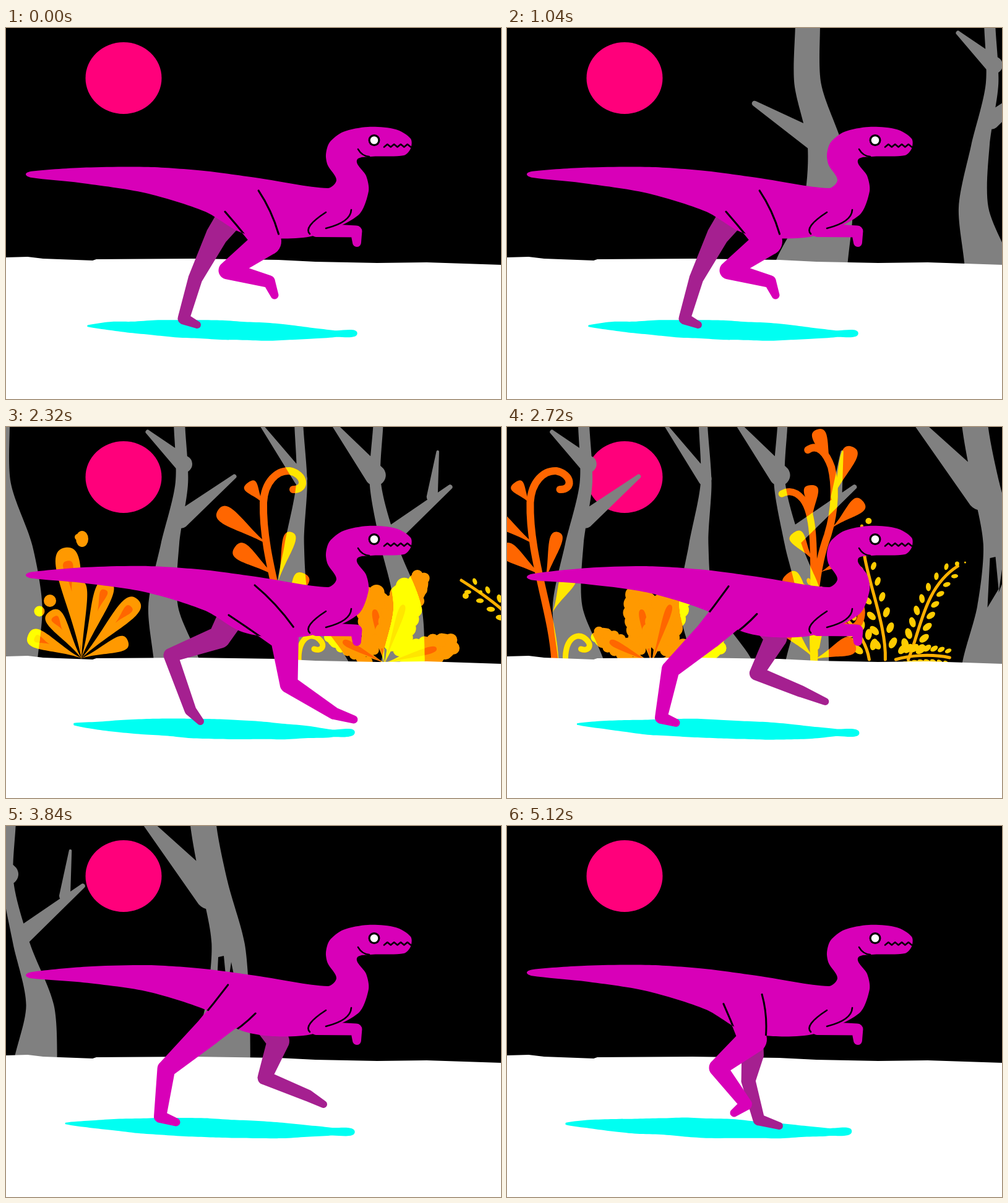
These frames come from a looping animation (800x600 px, 5.2 s). An HTML page with a canvas:

```html
<!DOCTYPE html>
<html lang="en">
<head>
<meta charset="utf-8">
<title>Running raptor</title>
<style>
html, body { margin: 0; width: 100%; height: 100%; overflow: hidden; background: #000; }
canvas { display: block; }
</style>
</head>
<body>
<canvas id="stage" width="800" height="600"></canvas>
<script>
const ctx = document.getElementById('stage').getContext('2d');
const STEP = 80, LOOP = 65, STRIDE = 13;
const SKIN = '#d800b8', SHADE = '#a52090';

const mix = (a, b, u) => a + (b - a) * u;
const noise = seed => (Math.abs(Math.sin(seed * 12.9898) * 43758.5453) % 1) - 0.5;

function fill(path, color) { ctx.fillStyle = color; ctx.fill(path); }
function stroke(path, width, color = '#000') {
  ctx.strokeStyle = color;
  ctx.lineWidth = width;
  ctx.stroke(typeof path === 'string' ? new Path2D(path) : path);
}
function dot(x, y, r, color, ry = r, turn = 0) {
  ctx.fillStyle = color;
  ctx.beginPath();
  ctx.ellipse(x, y, r, ry, turn, 0, 7);
  ctx.fill();
}

// Smooth closed outline through the points.
function spline(p, ease = 0.28) {
  const path = new Path2D(), at = i => p[(i + p.length) % p.length];
  const handle = (i, len) => {
    const a = at(i - 1), b = at(i + 1), dx = b[0] - a[0], dy = b[1] - a[1];
    const k = len / (Math.hypot(dx, dy) || 1);
    return [dx * k, dy * k];
  };
  path.moveTo(...p[0]);
  p.forEach((a, i) => {
    const b = at(i + 1), len = Math.hypot(b[0] - a[0], b[1] - a[1]) * ease;
    const h = handle(i, len), g = handle(i + 1, len);
    path.bezierCurveTo(a[0] + h[0], a[1] + h[1], b[0] - g[0], b[1] - g[1], ...b);
  });
  return path;
}

// Chain of tapered rounded segments through [x, y, radius] joints.
function limb(joints, path = new Path2D()) {
  joints.slice(1).forEach(([bx, by, br], i) => {
    const [ax, ay, ar] = joints[i], turn = Math.atan2(by - ay, bx - ax), q = Math.PI / 2;
    path.moveTo(ax - Math.sin(turn) * ar, ay + Math.cos(turn) * ar);
    path.arc(ax, ay, ar, turn + q, turn + 3 * q);
    path.arc(bx, by, br, turn - q, turn + q);
    path.closePath();
  });
  return path;
}

// ---- Runner ----
// Both legs share one gait, half a stride apart: phase, then knee, hock, ankle, toe.
const gait = [
  [0, 422, 345, 358, 392, 425, 410, 434, 432],
  [1, 432, 337, 396, 394, 468, 423, 515, 441],
  [2.5, 440, 348, 418, 407, 488, 436, 513, 450],
  [3, 450, 340, 457, 416, 530, 463, 562, 473],
  [5.5, 397, 370, 390, 412, 407, 475, 440, 485],
  [6.5, 341, 335, 306, 405, 287, 470, 309, 480],
  [7.5, 326, 338, 267, 392, 249, 470, 272, 478],
  [9, 326, 333, 259, 393, 249, 470, 275, 479],
  [9.5, 345, 340, 266, 369, 298, 458, 314, 476],
  [12, 397, 345, 341, 391, 386, 450, 367, 464],
];
const NEAR = [23, 14.5, 10, 6.5], FAR = [18, 11.5, 9.5, 6];

function legJoints(phase, radii) {
  phase %= STRIDE;
  const i = gait.findLastIndex(k => k[0] <= phase);
  const a = gait[i], b = gait[i + 1] || gait[0], end = i + 1 < gait.length ? b[0] : STRIDE;
  const u = (phase - a[0]) / (end - a[0]);
  return radii.map((r, j) => [mix(a[2 * j + 1], b[2 * j + 1], u), mix(a[2 * j + 2], b[2 * j + 2], u), r]);
}

const outline = [
  [534, 246], [520, 222], [517, 205], [523, 185], [545, 168], [585, 160], [630, 164], [654, 179], [654, 195],
  [643, 206], [590, 208], [567, 214], [582, 239], [586, 264], [569, 303], [497, 336], [430, 340], [378, 330],
  [322, 297], [225, 267], [120, 252], [40, 245], [32, 240], [41, 235], [130, 227], [230, 225], [320, 231],
  [410, 243], [520, 259],
];

function bodyPath(step) {
  const sway = -3.5 * Math.cos(step / STRIDE * 2 * Math.PI);
  return spline(outline.map(([x, y]) => [x, y + sway * (Math.max(0, 300 - x) / 270) ** 2]));
}

function shadowPath(step) {
  const left = 115 + 40 * noise(step + 1), right = 562 + 22 * noise(step + 20), edge = [];
  for (let i = 0; i <= 24; i++) {
    const u = 1 - Math.abs(1 - i / 12), side = i <= 12 ? -1 : 1;
    const half = 14 * Math.sin(Math.PI * u) ** 0.8 + 1.5 + 2 * noise(step * 30 + i);
    edge.push([mix(left, right, u), 481 + 15 * u + side * half]);
  }
  return spline(edge);
}

function thighLines(hip, knee) {
  const dx = knee[0] - hip[0], dy = knee[1] - hip[1], len = Math.hypot(dx, dy);
  for (const side of [1, -1]) {
    const nx = dy / len * side, ny = -dx / len * side, bow = side > 0 ? 33 : 26;
    stroke(`M${hip[0] + nx * 32} ${hip[1] + ny * 32}Q${hip[0] + dx / 2 + nx * bow} ${hip[1] + dy / 2 + ny * bow} `
      + `${knee[0] + nx * 22} ${knee[1] + ny * 22}`, 3);
  }
}

function drawRunner(step) {
  const body = bodyPath(step), hip = [381, 280, 32];
  const near = legJoints(step, NEAR), far = legJoints(step + STRIDE / 2, FAR);
  fill(shadowPath(step), '#00fff2');
  fill(limb([[mix(385, far[0][0], 0.5), 305, 22], ...far]), SHADE);
  fill(body, SKIN);
  fill(limb([[502, 327, 11], [566, 329, 9.5], [567, 347, 7]]), SKIN);
  fill(limb([hip, ...near]), SKIN);
  ctx.save();
  ctx.clip(body);
  thighLines(hip, near[0]);
  ctx.restore();
  stroke('M517 298Q480 322 491 333', 2.6);
  stroke('M517 324Q557 314 558 294', 2.6);
  stroke('M569 196Q575 207 587 208', 2.6);
  const mouth = new Path2D();
  for (let i = 0; i < 9; i++) mouth.lineTo(611 + i * 5.4, i % 2 ? 188 : 192.5);
  stroke(mouth, 2.6);
  dot(595, 181.5, 9.5, '#000');
  dot(595, 181.5, 6.3, '#fff');
}

// ---- Scenery ----
const ground = new Path2D('M0 371L35 370L60 373L140 376L146 374L300 373L440 375L500 378L600 380L680 379L800 383V600H0Z');
const hollow = new Path2D('M343 212L352 210L357 262L339 292ZM364 220L368 240L357 268Z');
const TREE_SPEED = 31.25;

// home: step at which the tree stands where drawn; bend: trunk centre every 100 px down;
// branches: foot, tip, radius at the foot.
const trees = [
  { home: 13, bend: [486, 486, 514, 518, 490], top: 20, base: 60, branches: [[495, 180, 400, 122, 17]] },
  { home: 21, bend: [530, 534, 515, 504, 528], top: 9, base: 38, branches: [[537, 60, 479, 8, 14], [532, 150, 619, 80, 14]] },
  { home: 21, bend: [723, 728, 716, 714, 758], top: 7, base: 50, branches: [[726, 84, 664, -1, 11]] },
  { home: 48, bend: [8, 3, 25, 55, 47], top: 8, base: 36,
    branches: [[3, 78, -62, -2, 17], [28, 176, 124, 97, 15], [95, 113, 104, 40, 9]] },
  { home: 48, bend: [318, 336, 359, 358, 346], top: 21, base: 49, branches: [[330, 110, 222, -12, 25]] },
].map(({ home, bend, top, base, branches }) => {
  const side = (i, s) => {
    const k = Math.min(4, Math.max(0, i));
    return [bend[k] + s * mix(top, base, (k / 4) ** 2.3), -10 + i * 100];
  };
  const rows = [-1, 0, 1, 2, 3, 4, 5];
  const path = spline([...rows.map(i => side(i, 1)), ...rows.reverse().map(i => side(i, -1))]);
  branches.forEach(([x, y, tx, ty, r]) => limb([[x, y, r], [tx, ty, r * 0.25]], path));
  return [home, path];
});

function addShifted(target, path, x) {
  target.addPath(path, new DOMMatrix([1, 0, 0, 1, x, 0]));
  return target;
}

// Plant colours: over the sky, over a tree.
const AMBER = ['#ff9900', '#ffff00'], RUST = ['#ff6600', '#ffe600'];
const STEM = '#ffb000', GOLD = '#ffcc00';

function leaf(x, y, tx, ty, w, color) {
  const dx = tx - x, dy = ty - y, len = Math.hypot(dx, dy), nx = -dy / len * w, ny = dx / len * w;
  ctx.fillStyle = color;
  ctx.beginPath();
  ctx.moveTo(x, y);
  ctx.bezierCurveTo(x + dx / 2 + nx * 0.1, y + dy / 2 + ny * 0.1, tx + nx, ty + ny, tx, ty);
  ctx.bezierCurveTo(tx - nx, ty - ny, x + dx / 2 - nx * 0.1, y + dy / 2 - ny * 0.1, x, y);
  ctx.fill();
}

function bush(lit) {
  leaf(122, 380, 122, 250, 20, AMBER[lit]);
  for (const [x, y, w] of [[96, 195, 42], [165, 248, 32], [213, 279, 34], [71, 298, 32], [36, 336, 32], [197, 346, 26]]) {
    leaf(122, 374, x, y, w, AMBER[lit]);
    if (w > 30) leaf(mix(122, x, 0.6), mix(374, y, 0.6), mix(122, x, 0.88), mix(374, y, 0.88), w * 0.42, RUST[lit]);
  }
  [[71, 281, 10], [54, 298, 8.5], [116, 178, 5]].forEach(d => dot(...d, AMBER[lit]));
  dot(123, 181, 10, AMBER[lit], 13);
}

function crook(lit) {
  const c = RUST[lit];
  stroke('M456 378C452 300 414 210 416 122C418 88 438 70 458 71C484 76 486 102 464 101', 12, c);
  stroke('M473 378C472 345 488 333 502 340C520 352 510 364 498 359', 9, c);
  [[426, 192, 343, 134, 30], [437, 242, 370, 194, 30], [416, 124, 391, 90, 24],
   [440, 250, 461, 170, 22], [452, 300, 482, 237, 28]].forEach(l => leaf(...l, c));
}

function fern(lit) {
  for (const [x, y, w] of [[672, 238, 38], [590, 266, 54], [522, 334, 34], [724, 350, 44], [653, 256, 56]]) {
    const dx = x - 612, dy = y - 382, len = Math.hypot(dx, dy);
    leaf(612, 382, x, y, w, AMBER[lit]);
    for (let u = 0.25; u <= 1; u += 0.12) {
      const side = w * 0.32 * Math.min(1, 3 - 2.6 * u);
      for (const s of [-side, side])
        dot(612 + dx * u - dy / len * s, 382 + dy * u + dx / len * s, w * 0.24, AMBER[lit]);
    }
    leaf(612, 382, 612 + dx * 0.75, 382 + dy * 0.75, 12, RUST[lit]);
  }
}

function tallPlant(lit) {
  const c = RUST[lit];
  stroke('M42 378C38 300 44 230 64 175C78 130 76 90 70 65C62 42 48 26 32 37', 12, c);
  stroke('M43 370C38 250 50 150 24 117Q8 98 -10 108', 11, c);
  stroke('M45 355C55 290 85 262 107 275C128 292 118 332 95 324C80 314 88 300 96 304', 12, c);
  [[72, 115, 104, 32, 28], [70, 164, 121, 120, 27], [52, 235, 111, 206, 26], [70, 72, 47, 4, 25],
   [39, 150, 37, 94, 25], [41, 216, 9, 171, 26], [42, 290, -2, 238, 32], [42, 374, -16, 308, 32],
   [42, 376, 108, 350, 32]].forEach(l => leaf(...l, c));
}

function spray() {
  const stems = [[262, 376, 255, 330, 210, 290, 143, 248], [288, 376, 290, 310, 248, 230, 250, 160],
    [325, 376, 345, 330, 350, 260, 405, 225], [305, 376, 325, 370, 360, 366, 392, 373]];
  for (const s of stems) {
    const at = u => [0, 1].map(k => (1 - u) ** 3 * s[k] + 3 * u * (1 - u) ** 2 * s[k + 2]
      + 3 * u * u * (1 - u) * s[k + 4] + u ** 3 * s[k + 6]);
    stroke(`M${s[0]} ${s[1]}C${s.slice(2)}`, 5, STEM);
    for (let i = 0; i < 8; i++) {
      const u = 0.08 + i * 0.115, [x, y] = at(u), [ax, ay] = at(u + 0.05);
      const turn = Math.atan2(ay - y, ax - x), size = 10 - 5 * u;
      for (const k of [-1, 1]) {
        const out = turn + k * 0.95, reach = size + 7;
        dot(x + Math.cos(out) * reach, y + Math.sin(out) * reach, size, GOLD, size * 0.6, turn + k * 0.6);
      }
    }
  }
  [[150, 273, 5], [174, 267, 3], [261, 152, 5], [235, 180, 5.5], [404, 221, 3.5], [417, 219, 1.5]]
    .forEach(d => dot(...d, GOLD));
}

// Plant, step at which it stands where drawn, speed in px per step.
const plants = [[bush, 29, 75.7], [crook, 29, 75.7], [fern, 29, 75.7], [spray, 40, 53.9], [tallPlant, 40, 75.7]];

function drawPlants(step, lit) {
  for (const [draw, home, speed] of plants) {
    ctx.save();
    ctx.translate((home - step) * speed, 0);
    draw(lit);
    ctx.restore();
  }
}

function drawScene(step) {
  ctx.fillStyle = '#000';
  ctx.fillRect(0, 0, 800, 600);
  dot(190, 81, 61.5, '#ff007b', 58);
  const woods = new Path2D();
  for (const [home, path] of trees) addShifted(woods, path, (home - step) * TREE_SPEED);
  fill(woods, '#808080');
  fill(addShifted(new Path2D(), hollow, (48 - step) * TREE_SPEED), '#000');
  drawPlants(step, 0);
  ctx.save();
  ctx.clip(woods);
  drawPlants(step, 1);
  ctx.restore();
  fill(ground, '#fff');
}

ctx.lineCap = ctx.lineJoin = 'round';
let start;
function tick(now) {
  start ??= now;
  const step = Math.floor((now - start) / STEP) % LOOP;
  drawScene(step);
  drawRunner(step % STRIDE);
  requestAnimationFrame(tick);
}
requestAnimationFrame(tick);
</script>
</body>
</html>
```
